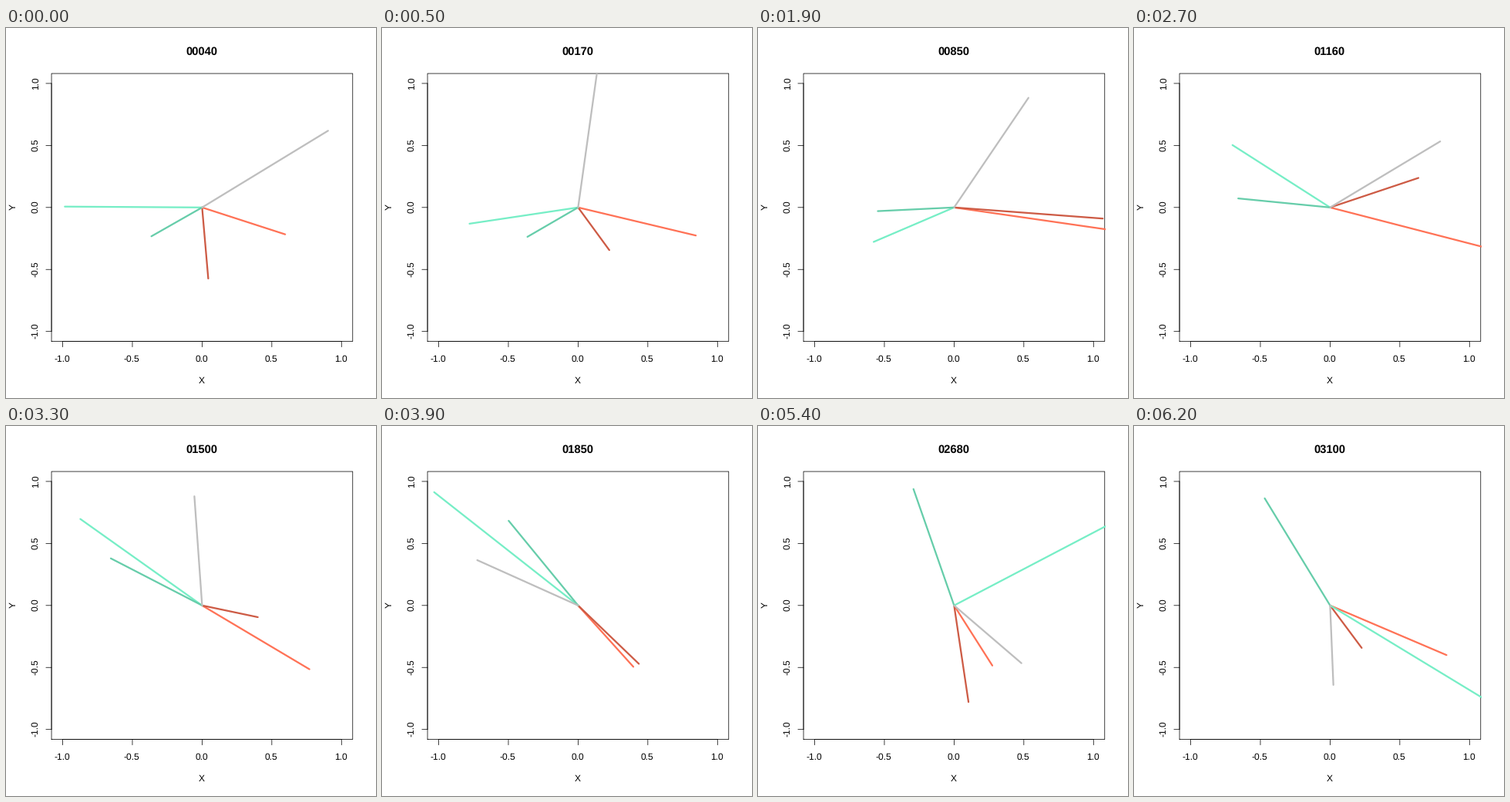
Write a matplotlib script that moves like this. It is 480 px wide and 480 px high and loops after 6300 ms.

```python
import numpy as np
import matplotlib.pyplot as plt
from matplotlib.animation import FuncAnimation
from matplotlib.patches import Rectangle

SIZE, DPI = 480, 80
PX = 72 / DPI                      # points per pixel
FRAMES, INTERVAL = 63, 100

LEFT, RIGHT, BOTTOM, TOP = 59.04, 449.76, 73.44, 420.96
LIMIT = 1.08
LINE = 14.4                        # height of one margin line

KEYS = np.array([0, 10, 19, 27, 39, 46, 62])
COUNTS = [40, 300, 850, 1160, 1850, 2250, 3100]

# Colour, length wave (mean, swing, peak, period) and turns in degrees
SPOKES = [
    ("#FF7256", (0.90, 0.46, 19.5, 56), [-20, -10, -9.2, -16.2, -51.3, -95.4, -25.6]),
    ("#CD5B45", (0.74, 0.33, 19, 28.5), [-85.6, -28.3, -4.8, 20.6, -47.2, -108.4, -56.5]),
    ("#76EEC6", (1.14, 0.53, 52, 74), [179.6, 199.5, 205.7, 144.3, 138.5, 95.2, -34.3]),
    ("#66CDAA", (0.71, 0.28, 58, 112), [212.6, 213.6, 183.1, 173.7, 126.1, 96, 118.5]),
    ("#BEBEBE", (0.87, 0.23, 4, 120), [34.4, 131.4, 58.9, 34, 153.2, 0, -87.9]),
]


def to_x(v):
    return (LEFT + RIGHT) / 2 + v * (RIGHT - LEFT) / (2 * LIMIT)


def to_y(v):
    return (BOTTOM + TOP) / 2 + v * (TOP - BOTTOM) / (2 * LIMIT)


def glide(values, t):
    """Ease from one key value to the next."""
    i = np.clip(np.searchsorted(KEYS, t, side="right") - 1, 0, len(KEYS) - 2)
    u = (t - KEYS[i]) / (KEYS[i + 1] - KEYS[i])
    u = 0.5 * u + 0.5 * u * u * (3 - 2 * u)
    return values[i] + (values[i + 1] - values[i]) * u


def tip(wave, turns, t):
    mean, swing, peak, period = wave
    radius = mean + swing * np.cos(2 * np.pi * (t - peak) / period)
    angle = np.radians(glide(turns, t))
    return to_x(radius * np.cos(angle)), to_y(radius * np.sin(angle))


plt.rcParams["font.family"] = "Liberation Sans"
plt.rcParams["text.hinting"] = "none"

fig = plt.figure(figsize=(SIZE / DPI, SIZE / DPI), dpi=DPI, facecolor="white")
ax = fig.add_axes([0, 0, 1, 1])
ax.set(xlim=(0, SIZE), ylim=(0, SIZE))
ax.axis("off")


def rule(xs, ys):
    ax.plot(xs, ys, color="black", lw=0.75 * PX, snap=False,
            solid_capstyle="round", solid_joinstyle="round", zorder=1)


def label(x, y, text, size=12, **style):
    return ax.text(x, y, text, fontsize=size * PX, ha="center", va="baseline",
                   rotation_mode="anchor", **style)


def row_label(v, margin, text):
    label(to_x(v) - 0.8, BOTTOM - margin * LINE, text)


def column_label(v, margin, text):
    label(LEFT - margin * LINE, to_y(v) + 0.7, text, rotation=90)


def draw_axes():
    rule([to_x(-1), to_x(1)], [BOTTOM, BOTTOM])
    rule([LEFT, LEFT], [to_y(-1), to_y(1)])
    for v in np.linspace(-1, 1, 5):
        x, y = to_x(v), to_y(v)
        rule([x, x], [BOTTOM, BOTTOM - LINE / 2])
        rule([LEFT, LEFT - LINE / 2], [y, y])
        row_label(v, 1.8, f"{v:.1f}")
        column_label(v, 1.2, f"{v:.1f}")
    rule([LEFT, RIGHT, RIGHT, LEFT, LEFT], [BOTTOM, BOTTOM, TOP, TOP, BOTTOM])
    row_label(0, 3.8, "X")
    column_label(0, 3.2, "Y")


draw_axes()
title = label(to_x(0) - 0.6, 445.1, "", size=14.8, weight="bold")

window = Rectangle((59, 72), 392, 349, transform=ax.transData)
lines = []
for color, *_ in SPOKES:
    line, = ax.plot([], [], color=color, lw=2.25 * PX,
                    solid_capstyle="round", zorder=2)
    line.set_clip_path(window)
    lines.append(line)


def update(frame):
    count = round(np.interp(frame, KEYS, COUNTS) / 10) * 10
    title.set_text(f"{count:05d}")
    for line, (_, wave, turns) in zip(lines, SPOKES):
        x, y = tip(wave, turns, frame)
        line.set_data([to_x(0), x], [to_y(0), y])
    return [title, *lines]


anim = FuncAnimation(fig, update, frames=FRAMES, interval=INTERVAL,
                     repeat=True, repeat_delay=0)
plt.show()
```
